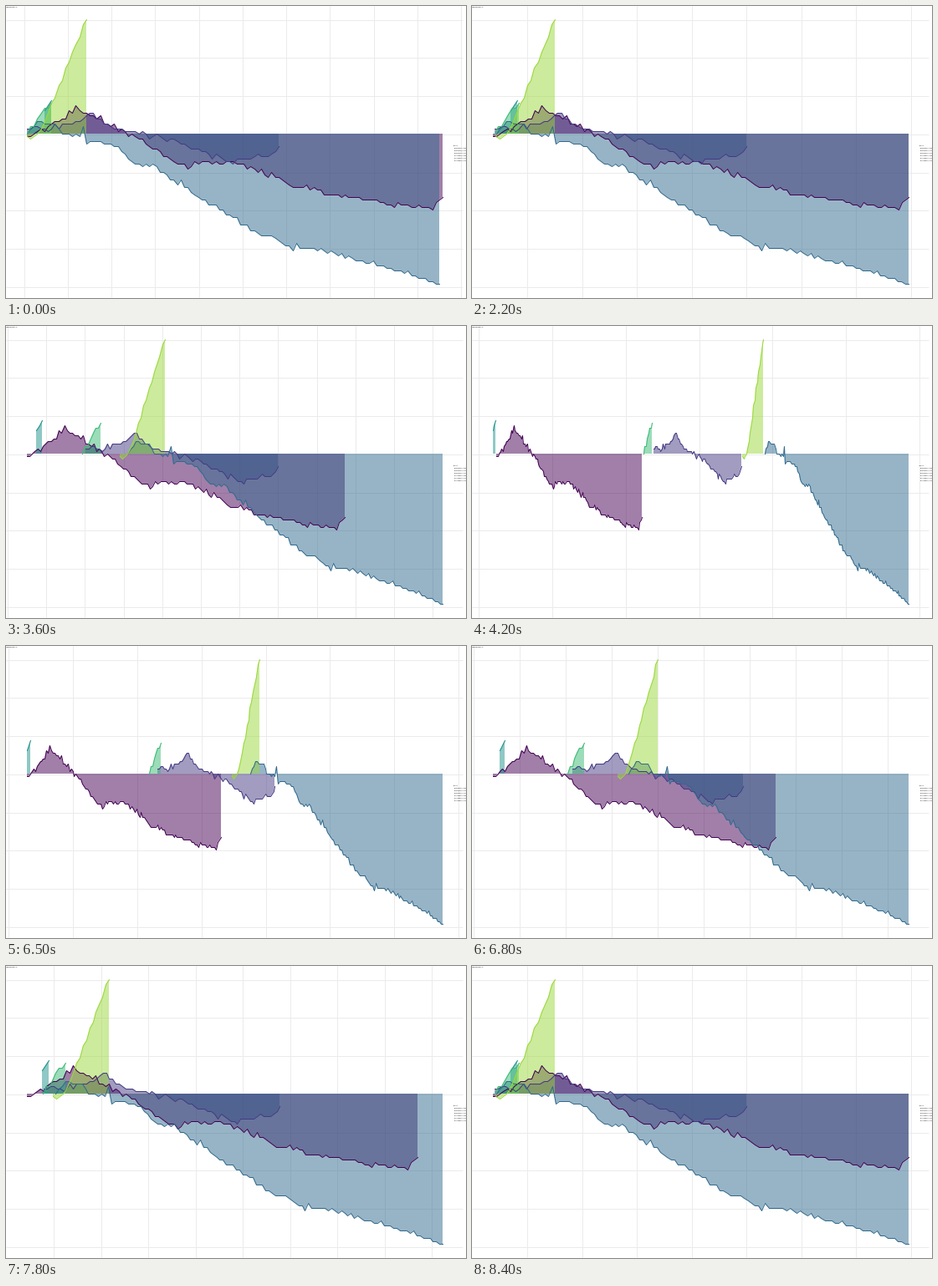
Write a matplotlib script that moves like this. It is 550 px wide and 350 px high and loops after 8500 ms.

```python
import math

import matplotlib.pyplot as plt
import numpy as np
from matplotlib.animation import FuncAnimation
from matplotlib.collections import LineCollection
from matplotlib.patches import Polygon

W, H, DPI = 550, 350, 100
PX = 72 / DPI                       # one pixel in points
STEPS, FRAMES = 21, 85
LEFT, SPAN = 24.9, 497.3            # pixel range of the data along x
PAD = 0.05
ZERO, UNIT = 152.8, 30.467          # pixel row of zero, pixels per point
PANEL_W, PANEL_H = 546, 349
WOBBLE = 0.06                       # monthly scatter of the jobless rate

# In order of time: label, rate at the outset, main turns as (month, rate).
PERIODS = [
    ("Recession, 1990", 5.5, [(6, 6.4), (8, 6.8)]),
    ("Expansion, 1991", 6.8, [(1, 6.7), (9, 7.2), (15, 7.8), (28, 7.0), (47, 5.4),
                              (49, 5.7), (62, 5.6), (80, 4.7), (105, 4.0),
                              (117, 3.9), (120, 4.3)]),
    ("Recession, 2001", 4.3, [(1, 4.3), (8, 5.5)]),
    ("Expansion, 2001", 5.5, [(1, 5.7), (12, 5.8), (19, 6.3), (26, 5.7), (39, 5.4),
                              (59, 4.4), (72, 4.7), (73, 5.0)]),
    ("Recession, 2007", 5.0, [(1, 4.9), (4, 5.0), (8, 6.1), (18, 9.5)]),
    ("Expansion, 2009", 9.5, [(1, 9.5), (4, 10.0), (10, 9.8), (12, 9.4), (16, 9.4),
                              (17, 9.8), (18, 9.2), (27, 9.0), (31, 8.3),
                              (37, 8.2), (64, 5.8), (75, 5.1), (87, 4.9),
                              (119, 3.6)]),
]


def tick_step(lo, hi, want=5):
    """Spacing of the best tick labels (extended Wilkinson scoring)."""
    size = hi - lo
    best, best_step = -math.inf, 1
    for i, q in enumerate((1, 5, 2, 2.5, 4, 3)):
        for step in (q, 10 * q):
            for first in range(math.floor(lo / step), math.ceil(hi / step)):
                for count in range(2, 10):
                    a, b = first * step, (first + count - 1) * step
                    simple = -i / 5 + (a <= 0 <= b)
                    cover = 1 - 0.5 * ((hi - b)**2 + (lo - a)**2) / (0.1 * size)**2
                    ratio = ((count - 1) / (b - a)
                             / ((want - 1) / (max(b, hi) - min(a, lo))))
                    dense = 2 - max(ratio, 1 / ratio)
                    score = 0.25 * simple + 0.2 * cover + 0.5 * dense
                    if score > best:
                        best, best_step = score, step
    return best_step


def build_series():
    """Months, calendar years and pixel rows of each period, sorted by label."""
    rng = np.random.default_rng(4)
    start, series = 0, []
    for label, base, turns in PERIODS:
        months, rates = zip(*turns)
        age = np.arange(months[0], months[-1] + 1)
        noise = rng.normal(0, WOBBLE, len(age))
        noise[[0, -1]] = 0
        rate = (np.interp(age, months, rates) + noise).round(1)
        year = 1991 + (start + np.arange(len(age))) / 12
        series.append((label, age, year, np.round(ZERO - UNIT * (rate - base))))
        start += len(age)
    return sorted(series, key=lambda s: s[0])


def layout(step):
    """Pixel x of every period and of the grid, from aligned to calendar."""
    e = step / STEPS
    xs = [(1 - e) * age + e * year for _, age, year, _ in series]
    lo, hi = min(x[0] for x in xs), max(x[-1] for x in xs)
    pad = PAD * (hi - lo)
    half = tick_step(lo - pad, hi + pad) / 2
    marks = half * np.arange(math.ceil((lo - pad) / half),
                             math.floor((hi + pad) / half) + 1)

    def to_px(x):
        return np.round(LEFT + (x - lo) * SPAN / (hi - lo))

    return [to_px(x) for x in xs], to_px(marks)


series = build_series()
layouts = [layout(s) for s in range(STEPS + 1)]

fig = plt.figure(figsize=(W / DPI, H / DPI), dpi=DPI, facecolor="white")
ax = fig.add_axes([0, 0, 1, 1])
ax.set(xlim=(0, W), ylim=(H, 0))
ax.axis("off")

# Strokes run through pixel centres, fills end on pixel edges.
grid_style = dict(colors="#ebebeb", linewidths=PX, zorder=1)
levels = np.round(ZERO - UNIT * np.arange(-6, 4.6, 1.5)) + 0.5
ax.add_collection(LineCollection([[(0, y), (PANEL_W, y)] for y in levels],
                                 **grid_style))
grid = ax.add_collection(LineCollection([], **grid_style))

areas, lines = [], []
for color in plt.get_cmap("viridis")(np.linspace(0, 0.85, len(series))):
    areas.append(ax.add_patch(Polygon([(0, 0), (0, 1)], facecolor=color,
                                      alpha=0.5, linewidth=0, zorder=2)))
    lines += ax.plot([], [], color=color, lw=PX, zorder=3)


def tiny(x, y, text):
    ax.text(x, y, text, fontsize=2 * PX, family="Liberation Sans",
            va="center", zorder=4)


tiny(0, 1.3, "Jobless rate, %")
tiny(535, 167.3, "period")
for i, (label, *_) in enumerate(series):
    tiny(536, 170.5 + 3 * i, label)


def draw(frame):
    step = min(max(frame - STEPS, 0), STEPS, FRAMES - frame)
    xs, marks = layouts[step]
    grid.set_segments([[(x, 0), (x, PANEL_H)] for x in marks + 0.5])
    floor = round(ZERO)
    for area, line, x, (*_, y) in zip(areas, lines, xs, series):
        line.set_data(x + 0.5, y + 0.5)
        area.set_xy([(x[0], floor), *zip(x, y), (x[-1], floor)])
    return [grid, *areas, *lines]


anim = FuncAnimation(fig, draw, frames=FRAMES, interval=100, repeat=True,
                     repeat_delay=0, init_func=lambda: draw(0))
plt.show()
```
